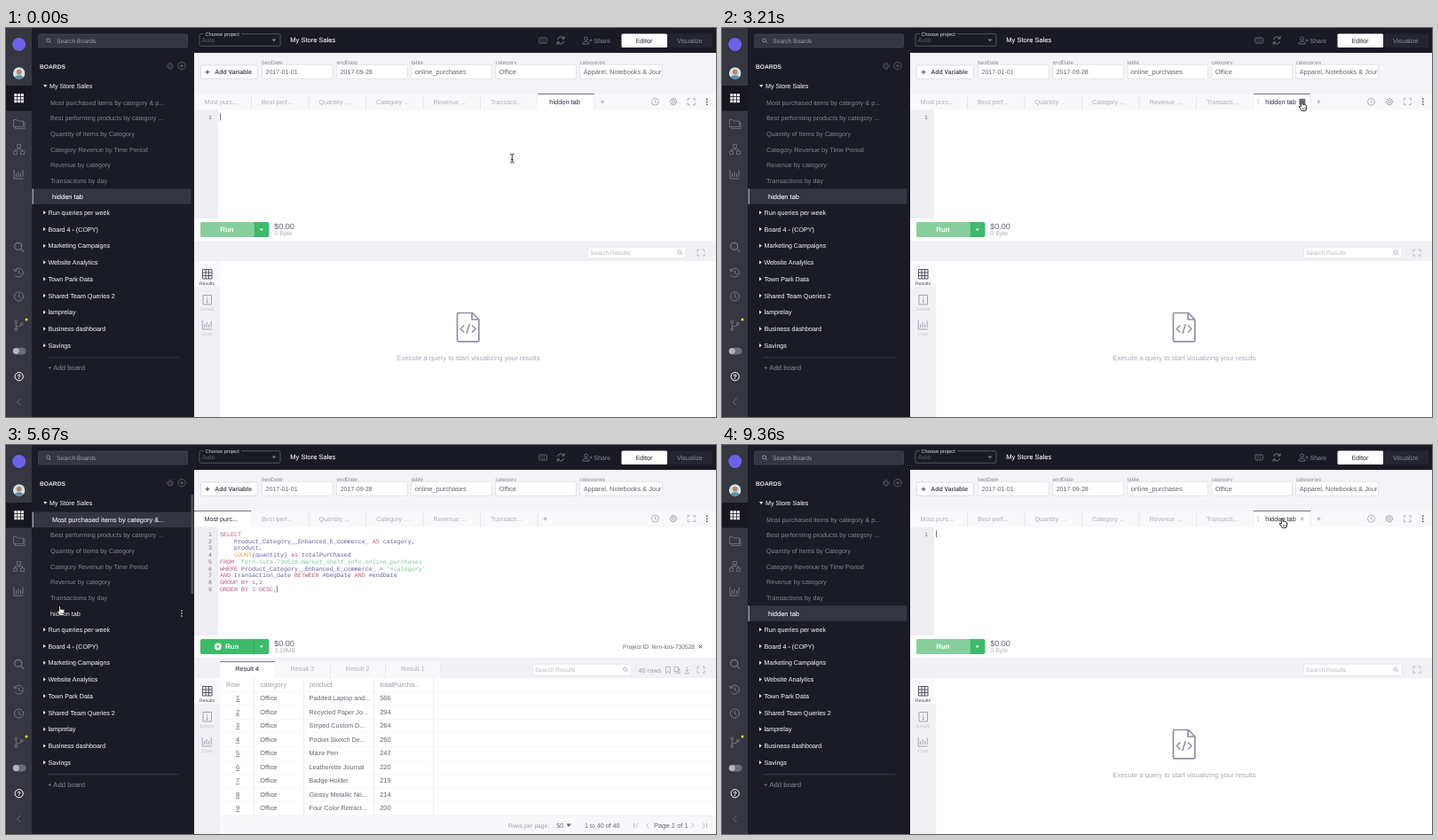
These frames come from a looping animation (800 by 439 pixels, 9390 ms). An HTML page:

```html
<!DOCTYPE html>
<html lang="en">
<head>
<meta charset="utf-8">
<title>Query editor</title>
<style>
html, body { margin: 0; width: 100%; height: 100%; overflow: hidden; background: #fff; }
svg { display: block; width: 100vw; height: 100vh; }
text { font-family: "Liberation Sans", Arial, sans-serif; text-rendering: geometricPrecision; white-space: pre; }
.code text { font-family: "Liberation Mono", monospace; font-size: 6.67px; }
</style>
</head>
<body>
<svg id="stage" viewBox="0 0 800 439"></svg>
<script>
const LOOP = 9390, CLOSE = 3450, OPEN = 6790, SETTLE = 6940;
const INK = '#454653', SOFT = '#62636f', MUTE = '#adadb9', LINE = '#dedee5', PALE = '#f1f1f5', DARK = '#1a1b24';

const esc = s => s.replace(/&/g, '&amp;').replace(/</g, '&lt;');
const rect = (x, y, w, h, fill, more = '') =>
  `<rect x="${x}" y="${y}" width="${w}" height="${h}" fill="${fill}" ${more}/>`;
const path = (d, color, w = 0.8, more = '') =>
  `<path d="${d}" fill="none" stroke="${color}" stroke-width="${w}" ${more}/>`;
const fill = (d, color) => `<path d="${d}" fill="${color}"/>`;
const circle = (x, y, r, color, w) =>
  `<circle cx="${x}" cy="${y}" r="${r}" ` + (w ? `fill="none" stroke="${color}" stroke-width="${w}"/>` : `fill="${color}"/>`);
// y is the middle of the line
const text = (x, y, s, size, color, more = '') =>
  `<text x="${x}" y="${y + size * 0.35}" font-size="${size}" fill="${color}" ${more}>${esc(s)}</text>`;
const medium = (x, y, s, size, color, more = '') =>
  text(x, y, s, size, color, `stroke="${color}" stroke-width=".1" ${more}`);
const bold = (x, y, s, size, color) => text(x, y, s, size, color, 'font-weight="700"');
const group = (id, ...parts) => `<g id="${id}">${parts.join('')}</g>`;
const box = (x, y, w, h, color = LINE, bg = '#fff') =>
  rect(x, y, w, h, bg, `rx="1.2" stroke="${color}" stroke-width=".8"`);
const dots = (x, y, color, r = 0.9, gap = 3) => [-gap, 0, gap].map(d => circle(x, y + d, r, color)).join('');
const lens = (x, y, r, color, w) =>
  circle(x, y, r, color, w) + path(`M${x + r * .7} ${y + r * .7}l${r * .9} ${r * .9}`, color, w);
const clock = (x, y, r, color, w = 0.8) => circle(x, y, r, color, w) + path(`M${x} ${y - r * .6}v${r * .65}l${r * .45} ${r * .3}`, color, w);
const corners = (x, y, color) =>
  path(`M${x - 4} ${y - 1}v-2.5h2.5M${x + 1.5} ${y - 3.5}h2.5v2.5M${x + 4} ${y + 1}v2.5h-2.5M${x - 1.5} ${y + 3.5}h-2.5v-2.5`, color);
const bars = (x, y, color, w = 1) =>
  path(`M${x - 5} ${y - 5}v10h10.5M${x - 2.5} ${y + 3}v-4M${x} ${y + 3}v-6M${x + 2.5} ${y + 3}v-4M${x + 5} ${y + 3}v-7.5`, color, w);
const cross = (x, y, r, color, w = 0.8) =>
  path(`M${x - r} ${y - r}l${2 * r} ${2 * r}m0 ${-2 * r}l${-2 * r} ${2 * r}`, color, w);
const plus = (x, y, r, color, w = 0.8) => path(`M${x - r} ${y}h${2 * r}M${x} ${y - r}v${2 * r}`, color, w);

function rail() {
  const c = '#777883';
  return rect(0, 0, 29, 439, '#363741') + rect(0, 65, 29, 28.5, '#17181f') +
    circle(14.7, 18.5, 7.5, '#6a63e8') +
    '<clipPath id="face"><circle cx="14.7" cy="51" r="6.8"/></clipPath>' +
    `<g clip-path="url(#face)">${circle(14.7, 51, 7, '#cfe3ea')}${circle(14.7, 49.7, 2.9, '#b98468')}` +
    `<ellipse cx="14.7" cy="58" rx="5.6" ry="4.8" fill="#5c8fa5"/></g>` +
    [0, 1, 2].map(i => [0, 1, 2].map(j => rect(9.3 + i * 3.8, 74.2 + j * 3.6, 3, 2.8, '#fff')).join('')).join('') +
    path('M8.5 111.5v-8h3.5l1 1.5h6.5v6.5zM10.5 111.5v2h10.5v-7h-1.5', c) +
    path('M12.5 131.5h4v3.5h-4zM8.5 139h4v3.5h-4zM16.5 139h4v3.5h-4zM14.5 135v2M10.5 139v-2h8v2', c) +
    bars(14, 165, c) + lens(13.7, 246.3, 4, c, 1.2) +
    path('M9.8 274a5 5 0 1 1 .3 4.8M8.6 271.5l1 3 3-.6M14.5 273.5v3l2.4 1.4', c, 1) + clock(14.5, 303, 5, c, 1) +
    path('M11.3 332.5v7M11.3 337c4 0 6-1 6-2.5', c, 1) +
    [[11.3, 331.3], [11.3, 340.2], [17.8, 333.8]].map(p => circle(...p, 1.4, c, 1)).join('') + circle(23, 329, 1.5, '#e8d62e') +
    rect(7.5, 360.8, 15, 7.6, '#6d6e7a', 'rx="3.8"') + circle(11.4, 364.6, 3.4, '#b4b5bf') +
    circle(14.7, 393.3, 4.6, '#fff', 1) + text(14.7, 393.4, '?', 7, '#fff', 'text-anchor="middle" font-weight="700"') +
    path('M16.5 418l-4 4 4 4', '#6f707b', 1);
}

const ITEMS = ['Most purchased items by category & p...', 'Best performing products by category ...', 'Quantity of Items by Category',
  'Category Revenue by Time Period', 'Revenue by category', 'Transactions by day', 'hidden tab'];
const rowY = i => 84.3 + i * 17.65;
const BOARDS = ['Run queries per week', 'Board 4 - (COPY)', 'Marketing Campaigns', 'Website Analytics', 'Town Park Data',
  'Shared Team Queries 2', 'lamprelay', 'Business dashboard', 'Savings'];

function sidebar() {
  const c = '#858691', dim = '#7d7e89', board = '#dedee5';
  return rect(29, 0, 183, 439, DARK) +
    rect(36.5, 7, 168, 15, '#353640', 'rx="1.5" stroke="#4c4d58" stroke-width=".6"') + lens(47.6, 13.9, 2, '#a0a1ab', .8) + text(57, 14.6, 'Search Boards', 6.7, '#a0a1ab') +
    bold(38, 43.4, 'BOARDS', 6.7, '#e4e4ea') +
    path('M181 42h3v-3M189 42h-3v-3M181 44h3v3M189 44h-3v3', dim, .6) + circle(198, 42.7, 4.2, dim, .6) + plus(198, 42.7, 2.2, dim, .6) +
    fill('M42 64h4.4l-2.2 3z', board) + medium(49, 65.7, 'My Store Sales', 7.15, board) +
    rect(30, 0, 178.5, 17.4, '#343541', 'id="pick"') + rect(29.6, 0, 1.2, 17.4, '#b9bac3', 'id="pickBar"') +
    ITEMS.slice(1, 6).map((s, i) => text(50, rowY(i + 1), s, 7.2, c)).join('') +
    text(50, rowY(0), ITEMS[0], 7.2, c, 'id="firstOff"') +
    medium(52, rowY(0), ITEMS[0].slice(0, -5) + '...', 7.45, '#e9e9ee', 'id="firstOn"') +
    text(50, rowY(6), ITEMS[6], 7.25, c, 'id="lastOff"') +
    medium(52, rowY(6), ITEMS[6], 7.5, '#f4f4f7', 'id="lastOn"') +
    group('rowMenu', dots(198, 190, '#e5e5ea', .8)) +
    group('grip', dots(37, 190, '#b8b9c2', .55, 1.8), dots(39, 190, '#b8b9c2', .55, 1.8)) +
    rect(208.3, 56, 3, 112, '#4b4c58', 'id="scroll" rx="1"') +
    BOARDS.map((s, i) => {
      const y = 208.3 + i * 18.75;
      return fill(`M42 ${y - 2.2}l2.8 2.2-2.8 2.2z`, board) + medium(47.5, y, s, 7.15, board);
    }).join('') +
    path('M47 371.8h148', '#4a4b57', .7) + text(47, 383, '+ Add board', 7.75, '#8a8b96');
}

function header() {
  const c = '#777883', soft = '#8d8e99';
  return rect(212, 0, 588, 28.3, '#191a23') +
    rect(218, 6.7, 91, 13.6, 'none', 'rx="1.5" stroke="#6b6c77" stroke-width=".7"') + rect(223, 4, 42, 6, '#191a23') +
    text(224.5, 7.5, 'Choose project', 5.7, '#dcdce2') + text(220.8, 13.7, 'Auto', 7.2, '#60616c') + fill('M299.5 12.5h5l-2.5 3z', c) +
    medium(320.3, 13, 'My Store Sales', 7.5, '#f4f4f7') +
    rect(600.8, 11, 8.5, 6, 'none', `rx=".7" stroke="${c}" stroke-width=".8"`) + path('M602.5 13h5M602.5 15h5', c, .8, 'stroke-dasharray="1 .8"') +
    path('M621.5 13a3.8 3.8 0 0 1 6.9-1.3M628.7 15a3.8 3.8 0 0 1-6.9 1.3M629 9.2v2.8h-2.8M621.2 18.8V16h2.8', soft) +
    circle(653.5, 12, 1.9, c, .8) + path('M649.8 18c0-4 7.4-4 7.4 0zM657.5 14h3M659 12.5v3', c) + text(662.5, 14.5, 'Share', 7, soft) +
    rect(693.5, 6.5, 51.7, 15.6, '#fff', 'rx="1.5"') + rect(745.2, 6.5, 51, 15.6, '#24252f', 'rx="1.5"') +
    medium(709.5, 14.6, 'Editor', 7.25, INK) + text(756, 14.6, 'Visualize', 7.25, soft);
}

function variables() {
  const fields = [['begDate', '2017-01-01', 288.3, 80, 7.05], ['endDate', '2017-09-28', 372.5, 80, 7.05],
    ['table', 'online_purchases', 456.5, 91, 7.4], ['category', 'Office', 551.5, 91, 7.4], ['categories', 'Apparel, Notebooks & Jour', 646.5, 93, 7.35]];
  return rect(212, 28.3, 588, 64.2, '#f4f4f8') + box(219.3, 42, 64, 15.3, '#d5d5dd') + plus(227, 49.8, 2.5, INK, 1) + bold(235.3, 49.8, 'Add Variable', 6.9, INK) +
    fields.map(([k, v, x, w, s]) => text(x, 38.4, k, 6.2, '#858691') + box(x, 41.3, w, 16) + text(x + 4.2, 49.3, v, s, SOFT)).join('');
}

const TABS = ['Most purc...', 'Best perf...', 'Quantity ...', 'Category ...', 'Revenue ...', 'Transacti...'];
const activeTab = x => rect(x, 74.5, 64.4, 18, '#fff') + rect(x, 74.2, 64.4, .8, '#555664');

function tabs() {
  const tx = i => 223.5 + i * 64.5, c = '#9c9da8';
  return rect(212, 74.5, 588, 18, '#f9f9fb') +
    TABS.map((s, i) => rect(276.2 + i * 64.5, 76, .7, 16, LINE) + text(tx(i), 83.9, s, 7.2, MUTE)).join('') +
    group('tabFirst', activeTab(212), medium(tx(0), 83.9, TABS[0], 7.2, INK), plus(607.7, 83.2, 2.2, c)) +
    group('tabLast', activeTab(598.8), rect(662.8, 76, .6, 16, LINE), medium(612.3, 83.9, 'hidden tab', 7.4, INK), plus(672.3, 83.2, 2.2, c)) +
    group('tabHover', dots(604, 83, '#777884', .55, 2.2), rect(650.3, 79.8, 7, 7, '#6c6d79', 'id="closeBg" rx="1"'), cross(653.7, 83.3, 1.7, '#777884', .7)) +
    group('tools', clock(731.5, 83.2, 4, c), circle(752, 83.2, 1.5, c, .8),
      circle(752, 83.2, 3.4, c, .8), path('M752 78.8v1.2M752 86.4v1.2M747.6 83.2h1.2M755.2 83.2h1.2M749 80.2l.8.8M755 86.2l-.8-.8M749 86.2l.8-.8M755 80.2l-.8.8', c, 1),
      corners(772.3, 83.2, c), dots(789.7, 83.2, SOFT, .95)) +
    group('locked', text(760, 83.3, 'Locked', 7.4, MUTE), path('M791 82.5h5.5v4h-5.5zM792 82.5v-1.5a1.75 1.75 0 0 1 3.5 0v1.5', MUTE));
}

const SQL = ['SELECT', '    Product_Category__Enhanced_E_commerce_ AS category,', '    product,', '    COUNT(quantity) as totalPurchased',
  'FROM `fern-lots-730528.market_shelf_info.online_purchases`', "WHERE Product_Category__Enhanced_E_commerce_ = '#category'",
  'AND transaction_date BETWEEN #begDate AND #endDate', 'GROUP BY 1,2', 'ORDER BY 3 DESC;'];
const lineY = i => 100.5 + i * 7.77;
const TOKEN = /(`.*`|'.*')|\b(SELECT|AS|as|FROM|WHERE|AND|BETWEEN|GROUP|ORDER|BY|DESC)\b|\b(COUNT)\b|\b(\d)\b/g;
const paint = s => s.replace(TOKEN, (m, str, key, fn) =>
  `<tspan fill="${str ? '#7cc596' : key ? '#bd5586' : fn ? '#d6a854' : '#9672b8'}">${m}</tspan>`);

function editor() {
  const num = i => text(228, lineY(i), String(i + 1), 6.67, '#777884');
  return rect(212, 92.5, 588, 147.5, '#fff') + rect(212, 92.5, 27.2, 122.5, '#eeeef2') +
    '<g class="code">' + num(0) +
    group('sql', SQL.map((s, i) => `<text x="241" y="${lineY(i) + 2.3}" fill="#6257a0">${paint(s)}</text>` + (i ? num(i) : '')).join(''),
      rect(305.2, 158.5, .7, 8, '#555')) + '</g>' +
    rect(241.2, 96.3, .8, 8, '#555', 'id="caret"') +
    rect(219, 219, 77.5, 17, '#3dba6a', 'rx="2"') + fill('M285.8 226.5h4l-2 2.6z', '#fff') +
    group('runOff', rect(219, 219, 60.8, 17, '#86cf9d', 'rx="2"'), bold(241.3, 227.6, 'Run', 7.9, '#fff')) +
    group('runOn', rect(279.4, 219, .7, 17, '#2fa359'), circle(238.8, 227.5, 3.9, '#fff'), fill('M237.6 225.4l3.4 2.1-3.4 2.1z', '#3dba6a'), bold(247, 227.6, 'Run', 7.9, '#fff')) +
    text(302.3, 223.8, '$0.00', 9, SOFT);
}

function emptyResults() {
  const c = '#8e8fa8';
  return text(302.3, 231.8, '0 Byte', 7, MUTE) + box(655.5, 247.2, 110.5, 12.8, '#e3e3e9') + text(658, 253.2, 'Search Results', 6.7, '#b8b8c3') +
    lens(759, 253, 2, '#a6a7b2', .8) + rect(241, 263, 559, 176, '#fff') +
    path('M508.5 323a1.5 1.5 0 0 1 1.5-1.5h15.5l7.3 7.5v23.3a1.5 1.5 0 0 1-1.5 1.5h-21.3a1.5 1.5 0 0 1-1.5-1.5zM525 321.5v7.5h7.5', c, 1.7) +
    path('M516.3 335.5l-4 4 4 4M525 335.5l4 4-4 4M522.3 334l-3.4 11', c, 1.5) +
    text(440.3, 372.2, 'Execute a query to start visualizing your results', 7.73, '#a8a9b7');
}

const ROWS = [['Padded Laptop and...', 566], ['Recycled Paper Jo...', 294], ['Striped Custom D...', 264], ['Pocket Sketch De...', 260], ['Maze Pen', 247],
  ['Leatherette Journal', 220], ['Badge Holder', 219], ['Glossy Metallic No...', 214], ['Four Color Retract...', 200]];

function table() {
  const c = '#9c9da8';
  const heads = [['Row', 248], ['category', 286.5], ['product', 342], ['totalPurcha...', 421.5]];
  return text(302.3, 231.8, '3.19MB', 6.95, MUTE) + text(695, 227.5, 'Project ID: fern-lots-730528', 6.64, SOFT) + cross(782.6, 227.5, 1.8, INK, 1) +
    rect(303.3, 244.5, 186.9, 18.5, '#f9f9fb') + rect(241, 244.5, 62.3, 18.5, '#fff') + rect(241, 244.3, 62.3, .8, '#555664') + medium(258.3, 252.3, 'Result 4', 7.3, INK) +
    [3, 2, 1].map((n, i) => rect(365 + i * 62.3, 246, .6, 17, LINE) + text(320.5 + i * 62.3, 252.3, 'Result ' + n, 7.25, MUTE)).join('') +
    box(593.5, 247.2, 111.5, 12.8, '#e3e3e9') + text(596.3, 253.2, 'Search Results', 6.7, '#b8b8c3') + lens(697.5, 253, 2, '#a6a7b2', .8) +
    text(712.5, 254, '40 rows', 7.35, c) + path('M743.5 250.5h4.8v7l-2.4-2-2.4 2zM753 250.5h4.5v5h-4.5zM755 255.5v2h4v-5h-1.5M767.3 250v5.5M765 253.5l2.3 2.3 2.3-2.3M764.5 257.6h5.6', c, .7) +
    rect(241, 263, 559, 176, '#fff') + heads.map(([s, x]) => text(x, 270.6, s, 7.7, c)).join('') +
    [279.5, 335.5, 414, 481].map(x => rect(x, 263, .6, 155, '#e2e2e8')).join('') +
    ROWS.map(([name, n], i) => {
      const y = 285.7 + i * 15.52;
      return rect(241, y - 7.7, 559, .5, '#f0f0f4') + text(261, y, String(i + 1), 7.4, SOFT, 'text-anchor="middle" text-decoration="underline"') +
        text(286.3, y, 'Office', 7.4, SOFT) + text(341.6, y, name, 7.2, SOFT) + text(421.2, y, String(n), 7.5, SOFT);
    }).join('') +
    rect(241, 418, 559, 21, '#f8f8fa') + rect(241, 418, 559, .5, '#e8e8ed') +
    text(565.5, 429.4, 'Rows per page:', 6.65, c) + text(620.2, 429, '50', 7.3, SOFT) + fill('M631.3 427.6h5.6l-2.8 3.4z', SOFT) +
    text(652, 429.6, '1 to 40 of 40', 7.1, SOFT) + text(730, 429.6, 'Page 1 of 1', 7.6, SOFT) +
    path('M707.5 426.7v5.6M712 426.7l-2.8 2.8 2.8 2.8M724.5 426.7l-2.8 2.8 2.8 2.8M772 426.7l2.8 2.8-2.8 2.8M785 426.7l2.8 2.8-2.8 2.8M789.5 426.7v5.6', MUTE);
}

function resultBar() {
  const mid = (y, s, c) => text(226.5, y, s, 5.1, c, 'text-anchor="middle"'), c = '#bdbdc9';
  return rect(212, 263, 29, 176, PALE) + rect(212, 263, 29, 29, '#fafafc') +
    path('M221.5 272.5h10.5v10.5h-10.5zM221.5 276h10.5M221.5 279.5h10.5M225 272.5v10.5M228.5 272.5v10.5', INK, .9) + mid(288, 'Results', INK) +
    path('M222 301.5h9.5v10.5h-9.5zM226.7 305.7v4M225.5 309.8h2.4M226.7 303.3v1.2', '#9a9bab', .9) + mid(317, 'Details', c) +
    bars(226.2, 335, '#9a9bab', .9) + mid(345.5, 'Chart', c) + corners(783, 253.6, MUTE);
}

const BEAM = 'M-2.5 -5q2.5 0 2.5 1.5q0 -1.5 2.5 -1.5M0 -3.8v7.6M-2.5 5q2.5 0 2.5 -1.5q0 1.5 2.5 1.5M-1.3 1.5h2.6';
const HAND = 'M-1.7 -4.6q.9 -1.2 1.8 0v3q.8 -.9 1.6 .1q.8 -.6 1.5 .3q1 -.4 1.4 .6v2.7q0 2 -1 3.3h-4.4l-3 -4.4q0 -1.3 2.1 -.2z';
const cursors = group('cursor',
  group('beam', path(BEAM, '#fff', 1.9), path(BEAM, '#222', .9)),
  group('hand', `<path d="${HAND}" fill="#fff" stroke="#111" stroke-width=".9" stroke-linejoin="round"/>`, path('M.5 2v2M1.9 2v2M3.2 2v2', '#111', .5)),
  group('arrow', '<path d="M-3 -5v9l2.2 -2 1.5 3.4 1.5 -.7 -1.5 -3.2h3z" fill="#111" stroke="#fff" stroke-width=".8"/>'));

const svg = document.getElementById('stage');
svg.innerHTML = rect(0, 0, 800, 439, '#fff') + rail() + sidebar() + header() + variables() + tabs() + editor() +
  rect(212, 240, 588, 23, PALE) + group('empty', emptyResults()) + group('table', table()) + resultBar() + cursors;

const el = {};
svg.querySelectorAll('[id]').forEach(n => el[n.id] = n);
const show = (on, ...ids) => ids.forEach(id => el[id].style.display = on ? '' : 'none');

// start, end, from, to, sag of the path
const MOVES = [
  [300, 940, [570.3, 147], [643, 88], 0],
  [2050, 2500, [643, 88], [654, 88], 0],
  [3603, 4653, [654, 88], [61.3, 187], 53],
  [5850, 6350, [61.3, 187], [69, 195], 0],
  [7400, 8600, [69, 195], [632, 88], 0]
];

function pointer(t) {
  let move = MOVES[0];
  for (const m of MOVES) if (t >= m[0]) move = m;
  const [a, b, from, to, sag] = move;
  const u = Math.min(1, Math.max(0, (t - a) / (b - a))), p = u * u * (3 - 2 * u);
  return [from[0] + (to[0] - from[0]) * p, from[1] + (to[1] - from[1]) * p + 4 * sag * p * (1 - p)];
}

function draw(t) {
  const [x, y] = pointer(t);
  const hidden = t < CLOSE || t >= OPEN;
  const settling = t >= OPEN && t < SETTLE;
  const lastPicked = hidden && !settling;
  const inSide = x < 212;
  const onRow = inSide && y > 180 && y < 200;
  const onTab = hidden && x > 599 && x < 663 && y > 74 && y < 93;
  const inEditor = x > 239 && y > 92.5 && y < 215;

  show(hidden, 'empty', 'runOff', 'tabLast');
  show(!hidden, 'table', 'runOn', 'tabFirst', 'sql');
  show(hidden && !(t > 3150 && t < CLOSE), 'caret');
  show(settling, 'locked', 'grip');
  show(!settling, 'tools');

  el.pick.setAttribute('y', lastPicked ? 181.4 : 75.6);
  el.pick.setAttribute('opacity', settling ? 0.7 : 1);
  el.pickBar.setAttribute('y', hidden ? 181.4 : 75.6);
  show(lastPicked, 'firstOff', 'lastOn');
  show(!lastPicked, 'firstOn', 'lastOff');
  el.firstOn.setAttribute('x', settling ? 50 : 52);
  el.lastOff.setAttribute('fill', onRow ? '#f2f2f5' : '#858691');

  show(onRow, 'rowMenu');
  show(inSide, 'scroll');
  show(onTab, 'tabHover');
  show(onTab && x > 649, 'closeBg');

  show(inEditor, 'beam');
  show(onTab || inSide, 'hand');
  show(!inEditor && !onTab && !inSide, 'arrow');
  el.cursor.setAttribute('transform', `translate(${x.toFixed(2)} ${y.toFixed(2)})`);
}

const start = performance.now();
function tick() {
  draw((performance.now() - start) % LOOP);
  requestAnimationFrame(tick);
}
tick();
</script>
</body>
</html>
```
